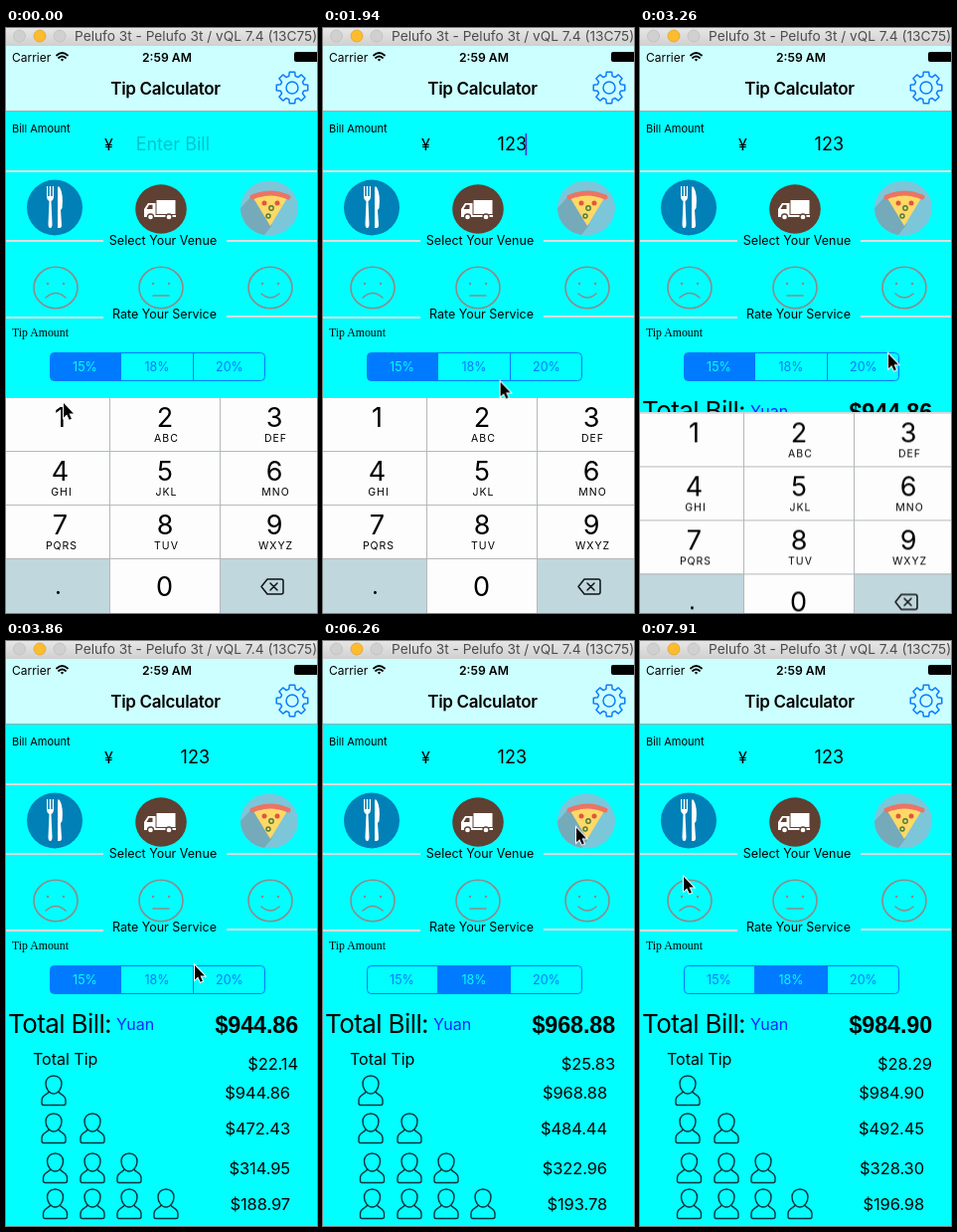
Write an HTML page that moves like this. It is 313 by 588 pixels and loops after 8 s.

```html
<!DOCTYPE html>
<html lang="en">
<head>
<meta charset="utf-8">
<title>Tip Calculator</title>
<style>
html, body { margin: 0; width: 100%; height: 100%; overflow: hidden; background: #0ff; }
svg { display: block; width: 313px; height: 588px; font-family: Inter, Roboto, sans-serif; }
.mid { text-anchor: middle; }
.end { text-anchor: end; }
.line { fill: none; stroke-linecap: round; stroke-linejoin: round; }
.times { font-family: "Liberation Serif", serif; }
.total { font: bold 23.3px "Liberation Sans", sans-serif; }
.seg { font-size: 12.5px; fill: #007aff; text-anchor: middle; }
.pick { fill: #0ff; }

.timed { opacity: 0; animation: 8s step-end infinite; }
#pad { animation: pad 8s infinite; }
#mouse { animation: mouse 8s step-end infinite; }
#caret { animation-name: caret; }
#press1 { animation-name: press1; }
#press2 { animation-name: press2; }
#press3 { animation-name: press3; }
#hint { animation-name: hint; }
#typed1 { animation-name: typed1; }
#typed2 { animation-name: typed2; }
#typed3 { animation-name: typed3; }
#sum0, #tip15 { animation-name: early; }
#tip18 { animation-name: late; }
#sum1 { animation-name: sum1; }
#sum2 { animation-name: sum2; }
#sum3 { animation-name: sum3; }

@keyframes press1 { 1.8% { opacity: 1 } 3.7% { opacity: 0 } }
@keyframes press2 { 5.55% { opacity: 1 } 7.4% { opacity: 0 } }
@keyframes press3 { 14.8% { opacity: 1 } 16.7% { opacity: 0 } }
@keyframes hint { 0% { opacity: 1 } 3.7%, 100% { opacity: 0 } }
@keyframes typed1 { 3.7% { opacity: 1 } 7.4%, 100% { opacity: 0 } }
@keyframes typed2 { 7.4% { opacity: 1 } 16.7%, 100% { opacity: 0 } }
@keyframes typed3 { 16.7%, 100% { opacity: 1 } }
@keyframes caret {
  3.7% { opacity: 1 } 13% { opacity: 0 }
  16.7% { opacity: 1 } 26% { opacity: 0 }
  31.6% { opacity: 1 } 40.7%, 100% { opacity: 0 }
}
@keyframes early { 0% { opacity: 1 } 55.7%, 100% { opacity: 0 } }
@keyframes late { 55.7%, 100% { opacity: 1 } }
@keyframes sum1 { 55.7% { opacity: 1 } 81.8%, 100% { opacity: 0 } }
@keyframes sum2 { 81.8% { opacity: 1 } 95%, 100% { opacity: 0 } }
@keyframes sum3 { 95%, 100% { opacity: 1 } }
@keyframes pad {
  0%, 40.6% { transform: none; animation-timing-function: ease-out }
  44.4%, 100% { transform: translateY(218px) }
}
@keyframes mouse {
  0% { transform: translate(57px, 376px) }
  3.7% { transform: translate(95px, 385px) }
  5.55% { transform: translate(155px, 396px) }
  7.4% { transform: translate(215px, 402px) }
  9.2% { transform: translate(267px, 407px) }
  18.6% { transform: translate(267px, 407px); animation-timing-function: steps(5) }
  27.8% { transform: translate(118px, 320px); animation-timing-function: steps(5) }
  37.1% { transform: translate(264px, 327px) }
  38.9% { transform: translate(264px, 327px); animation-timing-function: steps(5) }
  48.1% { transform: translate(189px, 325px); animation-timing-function: steps(2) }
  52% { transform: translate(152px, 338px) }
  57.4% { transform: translate(152px, 338px); animation-timing-function: steps(3) }
  63.1% { transform: translate(201px, 194px) }
  65.1% { transform: translate(162px, 181px); animation-timing-function: steps(3) }
  70.7% { transform: translate(152px, 177px) }
  72.6% { transform: translate(152px, 177px); animation-timing-function: steps(4) }
  80% { transform: translate(288px, 190px) }
  83.8% { transform: translate(288px, 190px); animation-timing-function: steps(2) }
  87.5% { transform: translate(213px, 228px); animation-timing-function: steps(6) }
  98.7%, 100% { transform: translate(43px, 236px) }
}
</style>
</head>
<body>
<svg viewBox="0 0 313 588">
  <defs>
    <linearGradient id="bar" x2="0" y2="1">
      <stop stop-color="#e6e6e6"/><stop offset="1" stop-color="#d0d0d0"/>
    </linearGradient>
    <g id="person" class="line" stroke="#06343c" stroke-width="1.400">
      <path d="M0 1C-5 1-8 4.500-8 9C-8 14-4.500 19 0 19S8 14 8 9C8 4.500 5 1 0 1Z"/>
      <path d="M-5 17.500C-7 20-12 20.500-12 25.500V28.500Q-12 30.500-10 30.500H10Q12 30.500 12 28.500V25.500C12 20.500 7 20 5 17.500"/>
    </g>
    <g id="face" class="line" stroke="#8f8a88" stroke-width="1.600">
      <ellipse rx="22" ry="20.700"/>
      <path stroke-width="2.400" d="M-8-4h.1M8-4h.1"/>
    </g>
  </defs>

  <rect width="313" height="588" fill="#0ff"/>
  <rect y="17" width="313" height="66" fill="#cff"/>
  <rect y="83" width="313" height="1" fill="#8fb2b2"/>
  <rect width="313" height="18" fill="url(#bar)"/>
  <g stroke-width=".7">
    <circle cx="13.500" cy="8" r="6" fill="#d0d0d0" stroke="#bcbcbc"/>
    <circle cx="34" cy="8" r="6" fill="#fdbc2e" stroke="#dfa023"/>
    <circle cx="54" cy="8" r="6" fill="#d0d0d0" stroke="#bcbcbc"/>
  </g>
  <text x="69" y="13" font-size="13.700" fill="#4c4c4c">Pelufo 3t - Pelufo 3t / vQL 7.4 (13C75)</text>

  <text x="6" y="33.500" font-size="12">Carrier</text>
  <g class="line" stroke="#000" stroke-width="1.800" stroke-linecap="butt">
    <path d="M51 27.500Q56.500 22.500 62 27.500M53 30Q56.500 27 60 30"/>
    <path d="M56.500 33.500L54.800 31.700Q56.500 30.500 58.200 31.700Z" fill="#000" stroke="none"/>
  </g>
  <text x="162" y="33.500" font-size="12.200" font-weight="600" class="mid">2:59 AM</text>
  <rect x="290" y="24" width="30" height="10" rx="2"/>
  <text x="160.500" y="67" font-size="17" font-weight="600" letter-spacing="-.3" class="mid">Tip Calculator</text>
  <g class="line" stroke="#0a7cff" stroke-width="1.500" transform="translate(288 60)">
    <path id="gear"/><circle r="6"/>
  </g>

  <text x="6" y="104.500" font-size="11">Bill Amount</text>
  <text x="103.500" y="122.500" font-size="16" class="mid">¥</text>
  <text id="hint" class="timed end" x="205" y="123" font-size="18" fill="#00c4cc">Enter Bill</text>
  <g class="end" font-size="18">
    <text id="typed1" class="timed" x="205" y="123">1</text>
    <text id="typed2" class="timed" x="205" y="123">12</text>
    <text id="typed3" class="timed" x="205" y="123">123</text>
  </g>
  <rect id="caret" class="timed" x="203.500" y="106" width="1.700" height="22" fill="#4a35d8"/>

  <path d="M0 144H313M0 214H98M222 214H313M0 291H98M222 290H313" stroke="#dedede" stroke-width="2"/>

  <circle cx="49" cy="180.500" r="28" fill="#0080b6"/>
  <g fill="#fff">
    <path d="M41 159V169Q41 173 43.500 174L42.500 197Q42.500 201 44.500 201T46.500 197L45.500 174Q48 173 48 169V159H46.800V169H45.200V159H43.800V169H42.200V159Z"/>
    <path d="M52 201V161Q52 158 54 160Q58 167 56.500 181L55 183L56 198Q56 201 54 201Z"/>
  </g>

  <ellipse cx="156" cy="182" rx="25.800" ry="24.700" fill="#5f4133"/>
  <g fill="#fff">
    <rect x="151.500" y="173" width="19" height="14"/>
    <path d="M139 189V182L143 176H150.500V188H171V190H139Z"/>
    <path d="M141.500 182L144 177.800H147.500V182Z" fill="#5f4133"/>
    <g stroke="#5f4133" stroke-width="1.300"><circle cx="145.500" cy="190" r="3"/><circle cx="164" cy="190" r="3"/></g>
  </g>

  <ellipse cx="265" cy="181" rx="29" ry="27.500" fill="#7cc6da"/>
  <path d="M248 168L236 181A29 27.500 0 0 0 260 208L268 198Z" fill="#75aabb"/>
  <path d="M249 171Q266 163 283 171L266 199Z" fill="#ffd966"/>
  <path d="M248 170Q266 162 284 170" class="line" stroke="#ec7463" stroke-width="5"/>
  <g fill="#e0563f"><circle cx="260" cy="176" r="2.500"/><circle cx="273" cy="176" r="2.500"/></g>
  <g class="line" stroke="#4f7a3a" stroke-width="1.400"><circle cx="267" cy="181" r="2.200"/><circle cx="264" cy="189" r="2"/></g>

  <text x="158" y="218" font-size="12.500" class="mid">Select Your Venue</text>
  <use href="#face" x="50" y="261"/>
  <use href="#face" x="156" y="261"/>
  <use href="#face" x="266" y="261"/>
  <path d="M40 271Q50 262 60 271M148 269H164M257 267Q266 275 275 267" class="line" stroke="#8f8a88" stroke-width="1.600"/>
  <text x="159.500" y="292" font-size="12.500" class="mid">Rate Your Service</text>

  <text x="6" y="310" font-size="11.800" class="times">Tip Amount</text>
  <g class="seg">
    <text x="79.500" y="345">15%</text><text x="152" y="345">18%</text><text x="225" y="345">20%</text>
    <g id="tip15" class="timed"><path d="M116 326.500H48.500Q44.500 326.500 44.500 330.500V350.500Q44.500 354.500 48.500 354.500H116Z"/><text class="pick" x="79.500" y="345">15%</text></g>
    <g id="tip18" class="timed"><rect x="116" y="326.500" width="72.500" height="28"/><text class="pick" x="152" y="345">18%</text></g>
  </g>
  <rect x="44.500" y="326.500" width="216" height="28" rx="4" fill="none" stroke="#007aff"/>
  <path d="M115.500 326.500V354.500M188.500 326.500V354.500" stroke="#007aff"/>

  <text x="2" y="393.500" font-size="26" letter-spacing="-.6">Total Bill:</text>
  <text x="111" y="391" font-size="16" fill="#1226ff">Yuan</text>
  <text x="27" y="426" font-size="16">Total Tip</text>
  <g id="people"></g>
  <g id="sums" class="end" font-size="16.500" letter-spacing="-.1"></g>

  <g id="pad">
    <rect y="371" width="313" height="217" fill="#fdfdfd"/>
    <path d="M0 533H104.500V588H0ZM215.500 533H313V588H215.500Z" fill="#bfd7dd"/>
    <g fill="#bfd7dd">
      <rect id="press1" class="timed" y="371" width="104.500" height="54"/>
      <rect id="press2" class="timed" x="104.500" y="371" width="111" height="54"/>
      <rect id="press3" class="timed" x="215.500" y="371" width="98" height="54"/>
    </g>
    <path d="M0 371.500H313M0 425.500H313M0 479.500H313M0 533.500H313M104.500 371V588M215.500 371V588" stroke="#b4b8b9"/>
    <g id="keys" class="mid"></g>
    <path d="M263 554H277Q279 554 279 556V567Q279 569 277 569H263L257 561.500ZM266 558l7 7M273 558l-7 7" class="line" stroke="#111" stroke-width="1.500"/>
  </g>

  <path id="mouse" d="M1 1V15.500L4.300 12.500L6.700 17.700L8.900 16.700L6.500 11.500H11Z" stroke="#fff" stroke-width="2" paint-order="stroke"/>
</svg>
<script>
const $ = id => document.getElementById(id);
const text = (x, y, s, attrs = '') => `<text x="${x}" y="${y}" ${attrs}>${s}</text>`;

const gear = [];
for (let i = 0; i < 8; i++) {
  for (const [r, d] of [[12, -.27], [16, -.17], [16, .17], [12, .27]]) {
    const a = i * Math.PI / 4 + d;
    gear.push((r * Math.cos(a)).toFixed(2) + ' ' + (r * Math.sin(a)).toFixed(2));
  }
}
$('gear').setAttribute('d', `M${gear.join('L')}Z`);

const letters = ['', 'ABC', 'DEF', 'GHI', 'JKL', 'MNO', 'PQRS', 'TUV', 'WXYZ'];
const columns = [54.5, 160, 270];
$('keys').innerHTML = letters.map((s, i) => {
  const x = columns[i % 3], y = 400.5 + 54 * Math.floor(i / 3);
  return text(x, y, i + 1, 'font-size="27"') +
    text(x + 1.5, y + 15.5, s, 'font-size="10.5" letter-spacing="1"');
}).join('') + text(159.5, 570.5, 0, 'font-size="27"') + text(52.5, 569, '.', 'font-size="24"');

const tops = [436, 474, 514, 550];
$('people').innerHTML = tops.map((y, row) =>
  Array.from({ length: row + 1 }, (_, i) =>
    `<use href="#person" x="${i ? 50 + 37 * i : row < 2 ? 48 : 49.5}" y="${y}"/>`).join('')
).join('');

// Total and tip, then each share of the total
const bills = [
  ['944.86', '22.14', '944.86', '472.43', '314.95', '188.97'],
  ['968.88', '25.83', '968.88', '484.44', '322.96', '193.78'],
  ['1008.92', '31.98', '1008.92', '504.46', '336.31', '201.78'],
  ['984.90', '28.29', '984.90', '492.45', '328.30', '196.98']
];
const baselines = [459.5, 495.5, 535.5, 571.5];
$('sums').innerHTML = bills.map(([total, tip, ...shares], i) =>
  `<g id="sum${i}" class="timed">` +
  text(294, 393.5, '$' + total, 'class="total"') +
  text(294, 430.5, '$' + tip) +
  shares.map((s, row) => text(286, baselines[row], '$' + s)).join('') + '</g>'
).join('');
</script>
</body>
</html>
```
